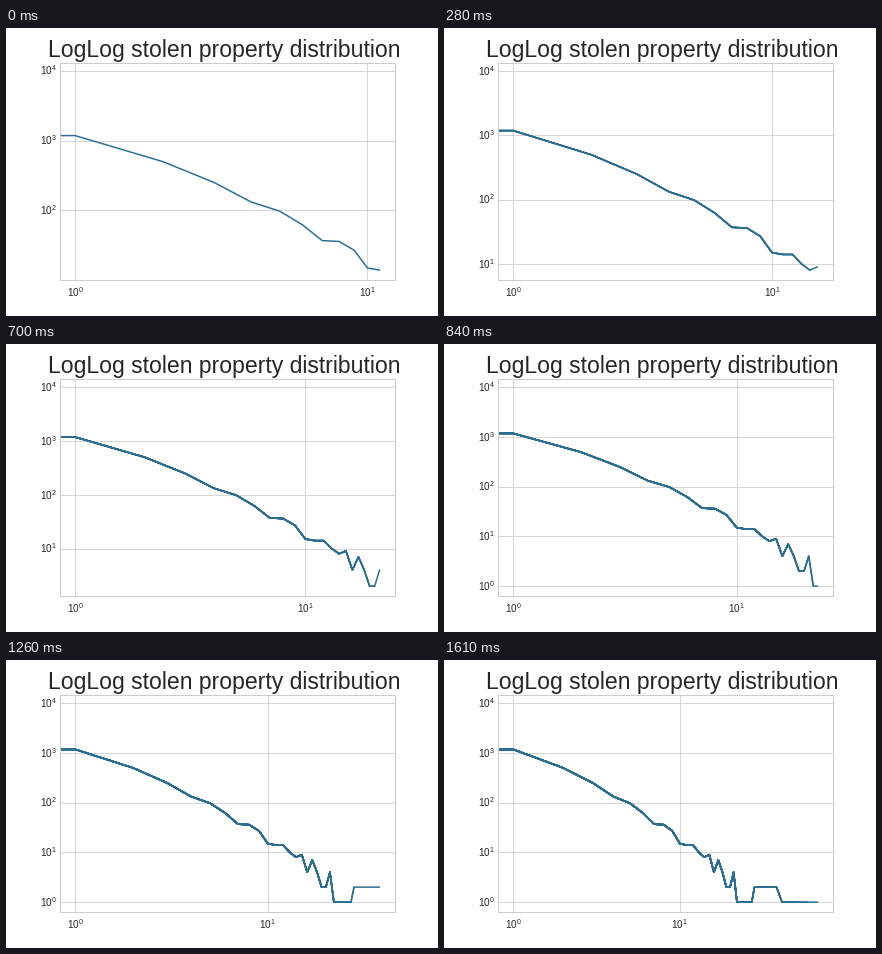
Recreate the animation shown at these times as a matplotlib script. Size 432x288 px, loop 2380 ms.

```python
import numpy as np
import matplotlib.pyplot as plt
from matplotlib.animation import FuncAnimation

W, H, DPI = 432, 288, 72
STEP_MS, FRAMES = 70, 34
FIRST = 12          # points visible at the start
MARGIN = 0.05
INK, RULE, BLUE = "0.15", "0.8", "#2c6e91"

plt.rcParams.update({
    "font.family": "Liberation Sans",
    "text.color": INK,
    "axes.edgecolor": RULE,
    "axes.linewidth": 1,
    "axes.axisbelow": True,
    "lines.solid_capstyle": "round",
})

x = np.array(list(range(29)) + [38, 41, 44, 50, 58, 67])
y = np.array([9440, 1178, 498, 249, 132, 98, 62, 37, 36, 27, 15, 14, 14,
              10, 8, 9, 4, 7, 4, 2, 2, 4] + [1] * 6 + [2, 2] + [1] * 5)
STEPS = len(x) - FIRST

fig = plt.figure(figsize=(W / DPI, H / DPI), dpi=DPI, facecolor="white")
ax = fig.add_axes([0.125, 0.125, 0.775, 0.755])


def put(px, py, text, size, ha):
    """Place text with its baseline at a pixel position from the top left."""
    return fig.text(px / W, 1 - py / H, text, size=size, ha=ha, va="baseline")


def padded(low, high):
    """Log limits with an equal margin on both sides."""
    a, b = np.log10([low, high])
    pad = MARGIN * (b - a)
    return 10 ** (a - pad), 10 ** (b + pad)


def power(n):
    return rf"$\mathdefault{{10^{{{n}}}}}$"


put(218.2, 29, "LogLog stolen property distribution", 22.95, "center")

# Each step adds one longer line on top of the earlier ones.
lines = [ax.loglog(x[:FIRST + k], y[:FIRST + k], color=BLUE, lw=1.5)[0]
         for k in range(STEPS + 1)]

ax.set_xticks([1, 10])
ax.set_yticks([10.0 ** n for n in range(5)])
ax.minorticks_off()
ax.tick_params(which="both", length=0, labelleft=False, labelbottom=False)
ax.grid(True, which="major", color=RULE, lw=0.8, ls="-")

x_labels = [put(0, 269, power(n), 10, "center") for n in range(2)]
y_labels = [put(50.5, 0, power(n), 10, "right") for n in range(5)]


def draw(frame):
    step = min(frame, STEPS)
    count = FIRST + step
    for k, line in enumerate(lines):
        line.set_visible(k <= step)

    ax.set_xlim(*padded(1, x[count - 1]))
    bottom, top = padded(y[:count].min(), y.max())
    ax.set_ylim(bottom, top)

    for n, label in enumerate(x_labels):
        px = ax.transData.transform((10.0 ** n, bottom))[0]
        label.set_x(px / W)
    for n, label in enumerate(y_labels):
        value = 10.0 ** n
        py = ax.transData.transform((1, value))[1]
        label.set_y((py - 4.8) / H)
        label.set_visible(bottom <= value <= top)
    return lines + x_labels + y_labels


anim = FuncAnimation(fig, draw, frames=FRAMES, interval=STEP_MS,
                     init_func=lambda: draw(0), repeat=True, repeat_delay=0)
plt.show()
```
